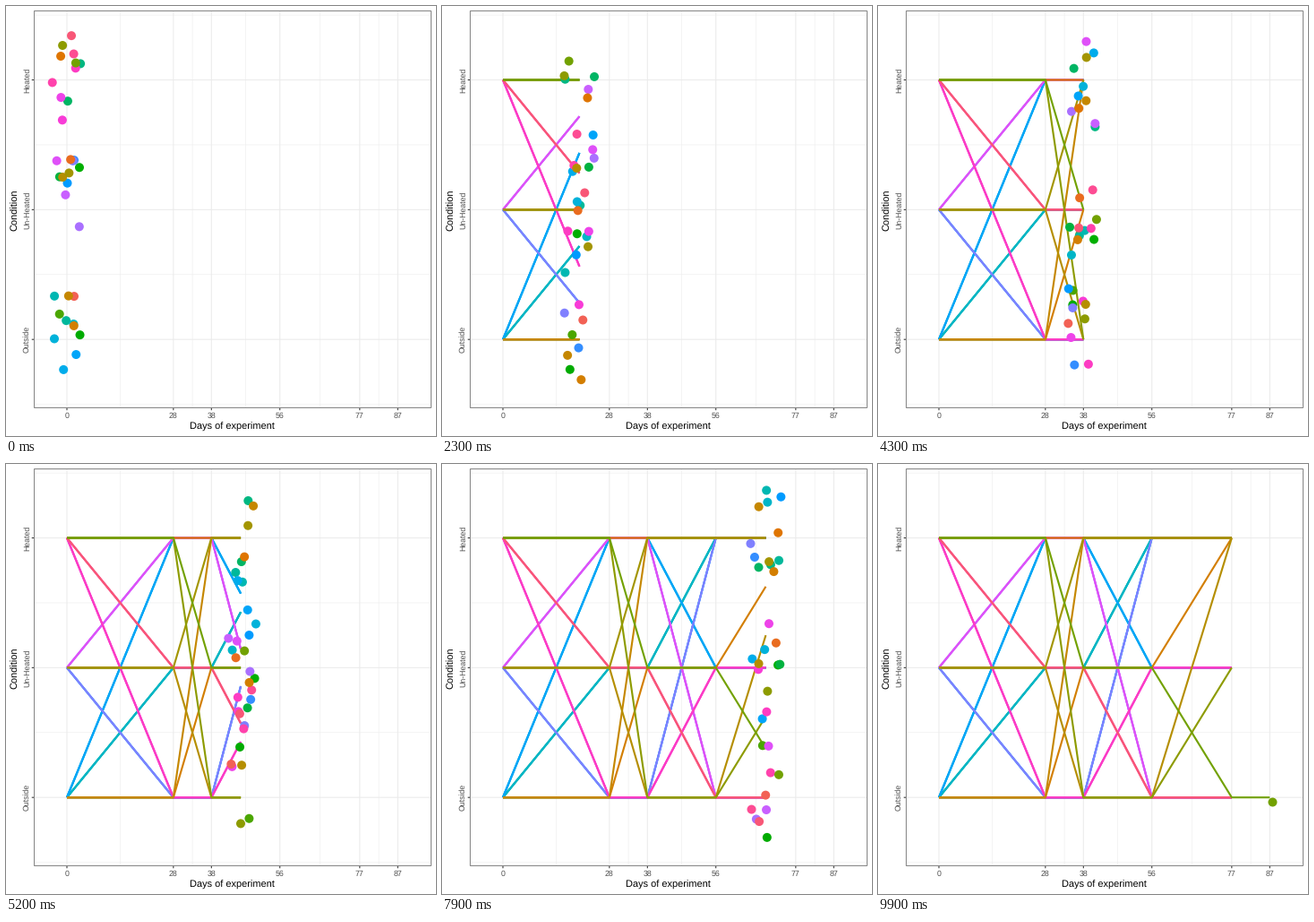
A matplotlib script that plays this animation: 480 by 480 pixels, repeating every 10 s.

```python
import numpy as np
import matplotlib.pyplot as plt
from matplotlib.animation import FuncAnimation
from matplotlib.collections import LineCollection
from matplotlib.patches import Rectangle

plt.rcParams["font.family"] = "Liberation Sans"
plt.rcParams["text.hinting"] = "none"

FRAMES, SIZE = 100, 480
DAYS = [0, 28, 38, 56, 77, 87]
# Each visit lands on a whole frame
KEYS = [round(d / 87 * (FRAMES - 1)) for d in DAYS]
NAMES = ["Heated", "Un-Heated", "Outside"]
LEVEL = {name[0]: 82.5 + 144.85 * k for k, name in enumerate(NAMES)}
LEFT, TOP, RIGHT, BOTTOM = 31.5, 5.5, 474.5, 448.5
GRID, DARK, GREY = "#ebebeb", "#333333", "#4d4d4d"

# Condition of each unit at its visits: fixed units, movers, late movers
FIXED = [c * 5 for c in "OUH"]
MOVERS = "OUUHH OHHUU UOOHH UHHOO HOOUU HUUOO".split()
LATE = "OOUUH OOHHH UUOOH UUHHH HHOOU HHUUOO".split()
UNITS = list(np.repeat(FIXED, 2)) + list(np.repeat(MOVERS, 3)) + FIXED + LATE
COUNT = len(UNITS)


def px(day):
    return 68 + 4.245 * day


def hcl(h, c=115, l=60):
    """Polar LUV to sRGB."""
    a = np.radians(h)
    y = ((l + 16) / 116) ** 3
    u = c * np.cos(a) / (13 * l) + 0.1978
    v = c * np.sin(a) / (13 * l) + 0.4683
    x = 9 * y * u / (4 * v)
    z = -x / 3 - 5 * y + 3 * y / v
    m = np.array([[3.2405, -1.5371, -0.4985],
                  [-0.9693, 1.8760, 0.0416],
                  [0.0556, -0.2040, 1.0572]])
    rgb = np.clip(m @ [x, y, z], 0, 1)
    return np.where(rgb > 0.00304, 1.055 * rgb ** (1 / 2.4) - 0.055, 12.92 * rgb)


COLORS = np.array([hcl(15 + 360 / COUNT * (k + 9)) for k in range(COUNT)])
# Fixed outside and un-heated units lie under the others
ORDER = sorted(range(COUNT), key=lambda k: UNITS[k] not in FIXED[:2])

fig = plt.figure(figsize=(SIZE / 72, SIZE / 72), dpi=72, facecolor="white")
ax = fig.add_axes([0, 0, 1, 1])
ax.set(xlim=(0, SIZE), ylim=(SIZE, 0))
ax.axis("off")


def rule(x, y, width=1.07, color=GRID):
    ax.plot(x, y, color=color, lw=width, zorder=1, solid_capstyle="butt", snap=False)


def vline(x, *args, y0=TOP, y1=BOTTOM):
    rule([x, x], [y0, y1], *args)


def hline(y, *args, x0=LEFT, x1=RIGHT):
    rule([x0, x1], [y, y], *args)


def label(x, y, text, size=8.8, color=GREY, angle=0):
    ax.text(x, y, text, size=size, color=color, rotation=angle,
            ha="center", va="center")


for a, b in zip(DAYS, DAYS[1:]):
    vline(px((a + b) / 2), 0.53)
for k in range(4):
    hline(10.1 + 144.85 * k, 0.53)
for d in DAYS:
    vline(px(d))
    vline(px(d), 1.07, DARK, y0=BOTTOM, y1=BOTTOM + 2.75)
    label(px(d), 457.5, str(d))
for name in NAMES:
    y = LEVEL[name[0]]
    hline(y)
    hline(y, 1.07, DARK, x0=LEFT - 2.75, x1=LEFT)
    label(23.5, y, name, angle=90)
label(252.8, 469.8, "Days of experiment", 11, "black")
label(10.8, 227.3, "Condition", 11, "black", 90)
ax.add_patch(Rectangle((LEFT, TOP), RIGHT - LEFT, BOTTOM - TOP, fill=False,
                       ec="#858585", lw=1, zorder=5, snap=False))

lines = LineCollection([], colors=COLORS[ORDER], linewidths=2.13, zorder=3,
                       capstyle="butt", joinstyle="round", snap=False)
ax.add_collection(lines)
dots = ax.scatter([], [], s=100, linewidths=0, zorder=4)


def trail(path, i):
    """Vertices of one unit's line up to frame i."""
    keys = KEYS[:len(path)]
    xs = [px(d) for d in DAYS[:len(path)]]
    ys = [LEVEL[c] for c in path]
    n = sum(k <= i for k in keys)
    tip = (np.interp(i, keys, xs), np.interp(i, keys, ys))
    return list(zip(xs[:n], ys[:n])) + [tip]


def jitter(i):
    rng = np.random.default_rng(700 + i)
    return rng.uniform(-1, 1, (COUNT, 2)) * (17, 58)


def update(i):
    trails = [trail(p, i) for p in UNITS]
    lines.set_segments([trails[k] for k in ORDER])
    live = [k for k, p in enumerate(UNITS) if KEYS[len(p) - 1] >= i]
    spots = np.array([t[-1] for t in trails]) + jitter(i)
    dots.set_offsets(spots[live])
    dots.set_facecolors(COLORS[live])
    return lines, dots


anim = FuncAnimation(fig, update, frames=FRAMES, interval=1000 / 10,
                     init_func=lambda: update(0), repeat=True, repeat_delay=0)
plt.show()
```
